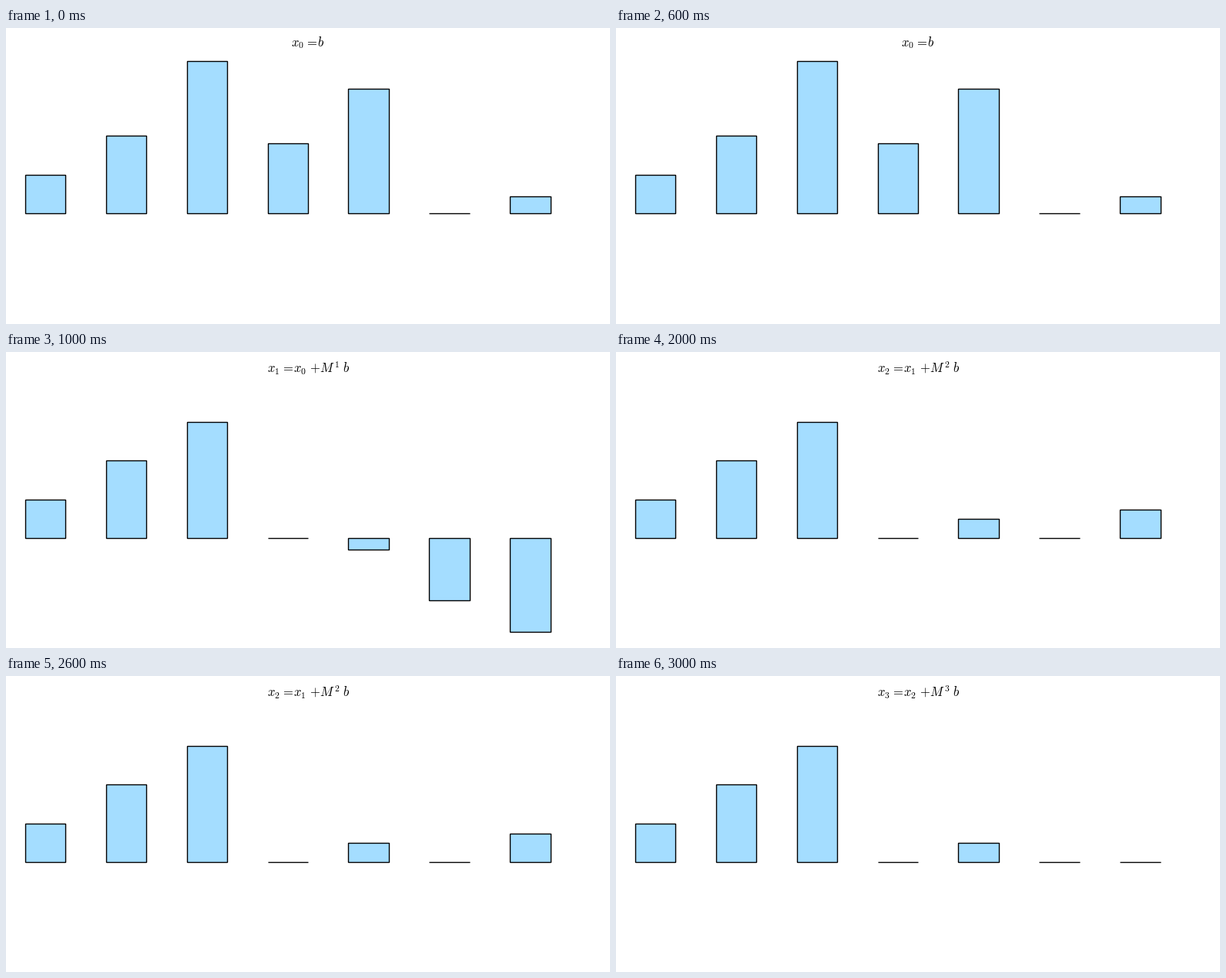
Recreate the animation shown at these times as a matplotlib script. Size 784x385 px, loop 4 s.

```python
import numpy as np
import matplotlib.pyplot as plt
from matplotlib.animation import FuncAnimation
from matplotlib.patches import Rectangle

WIDTH, HEIGHT, DPI = 784, 385, 100
LEFT, STEP = 25, 734 / 7
BAR_WIDTH = STEP / 2
STEPS = 4

# Solve (I - M) x = b with the Neumann series x_k = x_{k-1} + M^k b
solution = np.array([1, 2, 3, 0, 0.5, 0, 0])
size = len(solution)
M = -0.9 * np.eye(size, k=-2)
b = solution - M @ solution

plt.rcParams["mathtext.fontset"] = "cm"
fig = plt.figure(figsize=(WIDTH / DPI, HEIGHT / DPI), dpi=DPI, facecolor="white")
ax = fig.add_axes([0, 0, 1, 1])
ax.set_xlim(0, WIDTH)
ax.set_ylim(HEIGHT, 0)
ax.axis("off")

bars = [
    ax.add_patch(Rectangle((LEFT + i * STEP, 0), BAR_WIDTH, 0,
                           facecolor="#a4ddff", edgecolor="black", linewidth=1))
    for i in range(size)
]
title = ax.text(0, 0, "", fontsize=12, color="black", ha="left", va="baseline")


def iterate(k):
    return sum(np.linalg.matrix_power(M, j) @ b for j in range(k + 1))


def formula(k):
    gap, tight = r"\hspace{0.1}", r"\hspace{-0.15}"
    left = rf"x_{k}{gap}={tight}"
    if k == 0:
        return f"${left}b$"
    return rf"${left}x_{k - 1}{gap}+{tight}M^{k}\;b$"


def draw(k):
    # The taller formula with an exponent leaves less room for the bars
    if k == 0:
        base, unit, corner = 241.42, 50.8, (370, 24)
    else:
        base, unit, corner = 241.85, 50.3, (339, 27)
    for bar, value in zip(bars, iterate(k)):
        bar.set_y(base)
        bar.set_height(-unit * value)
    title.set_text(formula(k))
    title.set_position(corner)
    return [*bars, title]


anim = FuncAnimation(fig, draw, frames=STEPS, interval=1000, repeat=True,
                     repeat_delay=0, blit=False)
plt.show()
```
